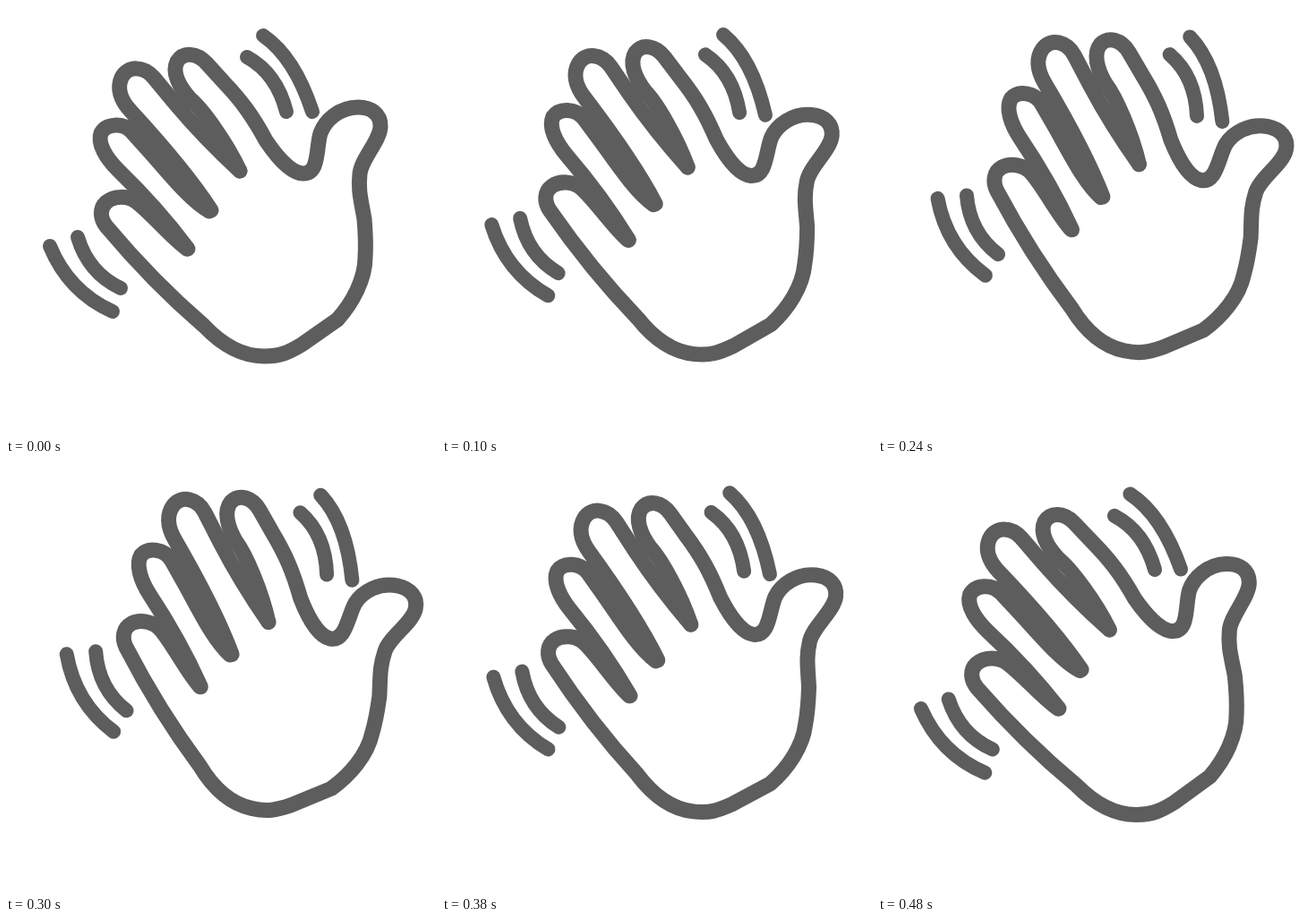
Animation, 480 px wide and 480 px high, one loop 500 ms. Source, as an HTML page:

```html
<!DOCTYPE html>
<html lang="en">
<head>
<meta charset="utf-8">
<title>Waving hand</title>
<style>
  html, body { margin: 0; height: 100%; overflow: hidden; background: #fff; }
  svg { display: block; width: 100vw; height: 100vh; }
  path { fill: none; stroke: #5d5d5d; stroke-width: 17; stroke-linecap: round; stroke-linejoin: round; }
  .swish { stroke-width: 16; }
</style>
</head>
<body>
<svg viewBox="0 0 480 480">
  <g id="hand">
    <!-- little finger, palm, thumb, index finger -->
    <path d="M202 271C184 258 164 233 146 219C136 211 120 212 112 219C104 226 105 237 112 246
      C143 283 178 320 221 357C240 377 262 391 288 391C306 391 315 387 330 378L370 350
      C387 331 401 305 401 280C402 265 401 250 400 238C396 215 393 206 395 187
      C397 170 418 150 418 134C418 121 408 113 393 113C372 113 356 128 351 142
      C346 158 350 187 332 187C317 187 300 165 290 150C275 122 262 105 244 86L224 64
      C213 52 198 51 191 62C185 74 193 90 206 104C220 116 246 152 261 184"/>
    <!-- middle finger, ring finger -->
    <path d="M261 184C235 160 205 128 189 109L165 80C154 67 136 66 129 80
      C124 91 127 104 139 117C174 155 207 194 229 228L227 229
      C204 216 178 182 158 160L140 140C130 130 112 131 106 142
      C102 154 112 170 125 183C153 210 179 239 203 271"/>
    <path class="swish" d="M287 33Q322 57 342 118M269 57Q302 75 313 118
      M49 268Q70 319 119 341M80 258Q92 298 128 315"/>
  </g>
</svg>
<script>
  const LOOP = 500, STEP = 20, STEPS = 24;
  const PIVOT = "311 325";
  // [step, angle in degrees]; one key beyond each end closes the loop
  const KEYS = [[-6, 6.7], [-1, -1.1], [0, 0], [4, 5.3], [7, 10.2], [11, 12],
                [13, 12.8], [16, 11.3], [18, 6.7], [23, -1.1], [24, 0]];
  const hand = document.getElementById("hand");

  const slope = i => (KEYS[i + 1][1] - KEYS[i][1]) / (KEYS[i + 1][0] - KEYS[i][0]);

  // Monotone tangent: flat at the turning points
  function tangent(i) {
    const a = slope(i - 1), b = slope(i);
    return a * b <= 0 ? 0 : 2 * a * b / (a + b);
  }

  function angleAt(step) {
    let i = 1;
    while (i < KEYS.length - 3 && step >= KEYS[i + 1][0]) i++;
    const [x0, y0] = KEYS[i], [x1, y1] = KEYS[i + 1];
    const w = x1 - x0, u = (step - x0) / w, v = 1 - u;
    return y0 * v * v * (1 + 2 * u) + y1 * u * u * (1 + 2 * v)
         + w * u * v * (tangent(i) * v - tangent(i + 1) * u);
  }

  function draw(now) {
    // The first pose is held for two steps
    const step = Math.min(STEPS - 1, Math.max(0, Math.floor((now % LOOP) / STEP) - 1));
    hand.setAttribute("transform", `rotate(${angleAt(step)} ${PIVOT})`);
  }

  const start = performance.now();
  function tick() {
    draw(performance.now() - start);
    requestAnimationFrame(tick);
  }
  tick();
</script>
</body>
</html>
```
